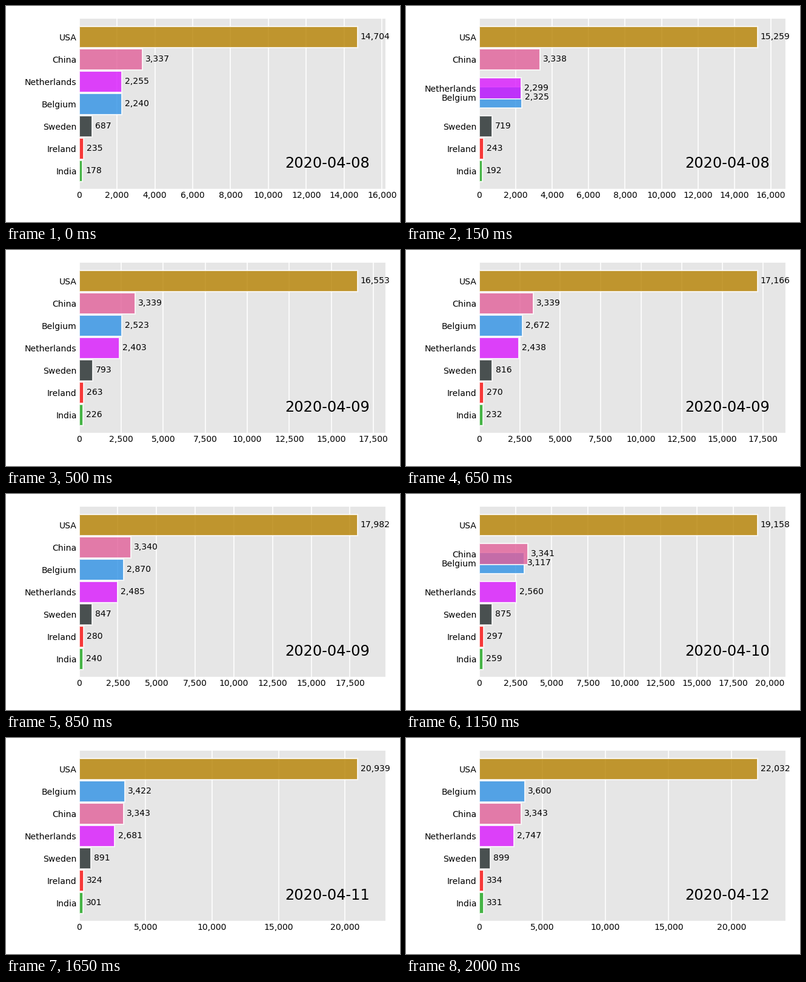
Animation, 650 px wide and 358 px high, one loop 2050 ms. Source, as a matplotlib script:

```python
import numpy as np
import matplotlib.pyplot as plt
from matplotlib.animation import FuncAnimation
from matplotlib.ticker import StrMethodFormatter

W, H, DPI = 650, 358, 144
LEFT, RIGHT, TOP, BOTTOM = 120.67, 625.67, 21.48, 303.1
STEPS = 10  # frames per day
FIRST_DAY = 8

# name: (colour, daily totals)
DATA = {
    "Belgium": ("#2E91E5", (2240, 2523, 3019, 3346, 3600)),
    "China": ("#E15F99", (3337, 3339, 3340, 3343, 3343)),
    "India": ("#1CA71C", (178, 226, 246, 288, 331)),
    "Ireland": ("#FB0D0D", (235, 263, 287, 320, 334)),
    "Netherlands": ("#DA16FF", (2255, 2403, 2520, 2653, 2747)),
    "Sweden": ("#222A2A", (687, 793, 870, 887, 899)),
    "USA": ("#B68100", (14704, 16553, 18595, 20471, 22032)),
}
names = list(DATA)
colors = [color for color, _ in DATA.values()]
totals = np.array([values for _, values in DATA.values()], float)
ranks = totals.argsort(axis=0).argsort(axis=0) + 1.0
n_bars, n_days = totals.shape
n_frames = (n_days - 1) * STEPS + 1

plt.rcParams["font.family"] = "DejaVu Sans"
fig = plt.figure(figsize=(W / DPI, H / DPI), dpi=DPI, facecolor="white")
ax = fig.add_axes([LEFT / W, 1 - BOTTOM / H, (RIGHT - LEFT) / W, (BOTTOM - TOP) / H])
ax.set_facecolor("0.9")
ax.set_ylim(0.2, n_bars + 0.8)
ax.grid(True, axis="x", color="white", linewidth=0.8)
ax.set_axisbelow(True)
ax.tick_params(length=0, labelsize=7, pad=2)
ax.xaxis.set_major_formatter(StrMethodFormatter("{x:,.0f}"))
ax.spines[:].set_visible(False)

bars = ax.barh(ranks[:, 0], totals[:, 0], height=0.95, color=colors,
               edgecolor="white", linewidth=1, alpha=0.8)
labels = [ax.text(0, 0, "", size=7, ha="left", va="center") for _ in names]
date = ax.text(0.95, 0.15, "", size=12, ha="right", va="center",
               transform=ax.transAxes)


def at(table, frame):
    """Linear blend between the two neighbouring days."""
    day, step = divmod(frame, STEPS)
    following = min(day + 1, n_days - 1)
    return table[:, day] + (table[:, following] - table[:, day]) * step / STEPS


def update(frame):
    values, places = at(totals, frame), at(ranks, frame)
    limit = values.max() * 1.1
    ax.set_xlim(0, limit)
    ax.set_yticks(places, names)
    for bar, label, value, place in zip(bars, labels, values, places):
        bar.set_width(value)
        bar.set_y(place - bar.get_height() / 2)
        label.set_position((value + 0.01 * limit, place))
        label.set_text(f"{value:,.0f}")
    date.set_text(f"2020-04-{FIRST_DAY + frame // STEPS:02d}")
    return [*bars, *labels, date]


anim = FuncAnimation(fig, update, frames=n_frames, interval=50, repeat=True)
plt.show()
```
